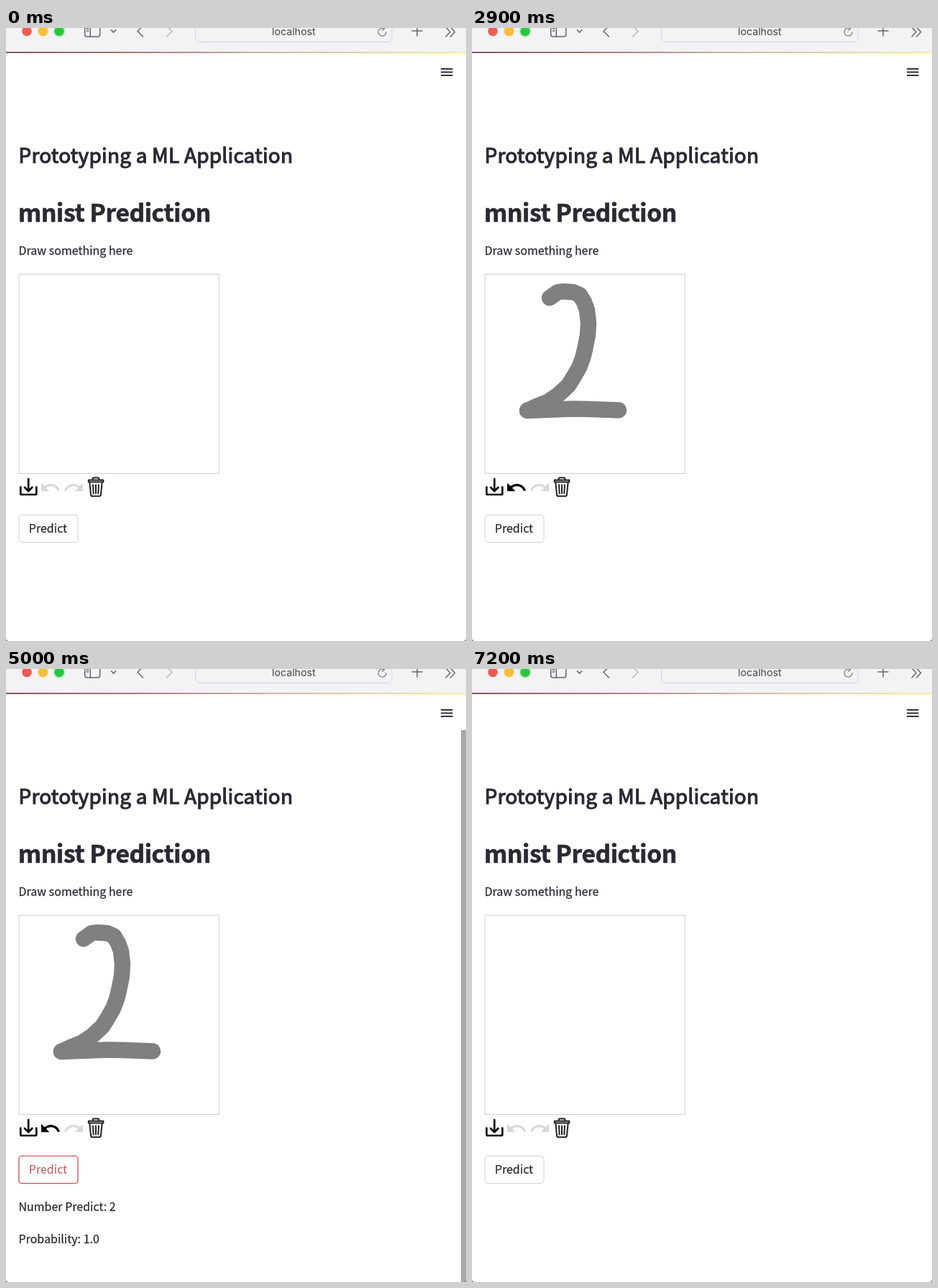
Animation, 640 px wide and 854 px high, one loop 8000 ms. Source, as an HTML page:

```html
<!DOCTYPE html>
<html lang="en">
<head>
<meta charset="utf-8">
<title>mnist Prediction</title>
<style>
  html, body { margin: 0; width: 100%; height: 100%; overflow: hidden; background: #fff; }
  svg { display: block; width: 100vw; height: 100vh; }
  text { font: 400 16px "Noto Sans CJK JP", "Noto Sans CJK SC", "Noto Sans CJK KR", "Noto Sans CJK", "Noto Sans", sans-serif; fill: #292a33; stroke: #292a33; stroke-width: .25px; }
  .address { font: 400 14.2px Inter, sans-serif; fill: #444347; stroke: none; }
  .title { font-size: 28px; letter-spacing: .21px; stroke-width: 1.15px; }
  .heading { font-size: 33.5px; font-weight: 700; letter-spacing: -.33px; stroke-width: .7px; }
  .status { font-size: 14px; }
  .faint { fill: #b0b1b6; stroke: none; }
  .alert { fill: #c25053; stroke: none; }
  .line { fill: none; stroke-linecap: round; stroke-linejoin: round; }
  .chrome { stroke: #67656a; stroke-width: 1.5; }
  .off { fill: #d9d9dd; }

  .ink { stroke: #808080; stroke-width: 22.4; }
  .anim { animation: 8s step-end infinite; }
  #curve { stroke-dasharray: 248 400; animation-name: curve; }
  #base { stroke-dasharray: 129 400; animation-name: base; }
  #undo { animation-name: undo; }
  #running { animation-name: running; }
  #results { animation-name: results; }
  #hover { animation-name: hover; }
  #trash { stroke: #222; animation-name: trash; }

  @keyframes curve {
    0% { opacity: 0; stroke-dashoffset: 247.4; }
    1.25% { opacity: 1; stroke-dashoffset: 247.4; animation-timing-function: steps(9, end); }
    12.5% { opacity: 1; stroke-dashoffset: 110.6; animation-timing-function: steps(7, end); }
    21.25% { opacity: 1; stroke-dashoffset: 0; }
    82.5%, 100% { opacity: 0; stroke-dashoffset: 0; }
  }
  @keyframes base {
    0% { opacity: 0; stroke-dashoffset: 128; }
    22.5% { opacity: 1; stroke-dashoffset: 128; animation-timing-function: steps(8, end); }
    32.5% { opacity: 1; stroke-dashoffset: 0; }
    82.5%, 100% { opacity: 0; stroke-dashoffset: 0; }
  }
  @keyframes undo {
    0% { fill: #d9d9dd; }
    36.25% { fill: #050505; }
    82.5%, 100% { fill: #d9d9dd; }
  }
  @keyframes running {
    0% { opacity: 0; }
    38.75% { opacity: .5; }
    40% { opacity: 1; }
    41.25% { opacity: 0; }
    52.5% { opacity: .5; }
    53.75% { opacity: 1; }
    60% { opacity: 0; }
    87.5% { opacity: .5; }
    88.75% { opacity: 1; }
    90%, 100% { opacity: 0; }
  }
  @keyframes results {
    0% { opacity: 0; }
    58.75% { opacity: 1; }
    88.75%, 100% { opacity: 0; }
  }
  @keyframes hover {
    0% { opacity: 0; }
    45% { opacity: 1; }
    75%, 100% { opacity: 0; }
  }
  @keyframes trash {
    0% { stroke: #222; }
    77.5% { stroke: #c2474a; }
    88.75%, 100% { stroke: #222; }
  }
</style>
</head>
<body>
<svg viewBox="0 0 640 854" preserveAspectRatio="none">
  <defs>
    <linearGradient id="accent">
      <stop offset="0" stop-color="#74484b"/>
      <stop offset=".3" stop-color="#a1736f"/>
      <stop offset=".6" stop-color="#c8b5a8"/>
      <stop offset="1" stop-color="#f4eeb2"/>
    </linearGradient>
    <linearGradient id="glow">
      <stop offset=".4" stop-color="#fffbe0" stop-opacity="0"/>
      <stop offset="1" stop-color="#fffbd0"/>
    </linearGradient>
    <path id="arrow" d="M12.5 8c-2.65 0-5.05 1-6.9 2.6L2 7v9h9l-3.6-3.6c1.4-1.2 3.1-1.9 5.1-1.9 3.5 0 6.5 2.3 7.6 5.5l2.4-.8C21.1 11 17.1 8 12.5 8z"/>
  </defs>

  <!-- browser bar -->
  <rect width="640" height="34" fill="#f4f2f5"/>
  <rect y="33.2" width="640" height="1.8" fill="url(#accent)"/>
  <rect y="35" width="640" height="3" fill="url(#glow)"/>
  <circle cx="52" cy="4.5" r="8.5" fill="#fbe9b8" opacity=".6"/>
  <circle cx="74" cy="4.5" r="9" fill="#aef0b6" opacity=".6"/>
  <circle cx="29" cy="4.5" r="6.8" fill="#ee5c54"/>
  <circle cx="51.5" cy="4.5" r="6.8" fill="#f6be3a"/>
  <circle cx="74" cy="4.5" r="6.8" fill="#2ac73f"/>
  <g class="line chrome">
    <rect x="109.7" y="-5" width="21" height="17" rx="3"/>
    <path d="M117.3 -5V12M112.3 1h2.4M112.3 4h2.4M146.3 2.8l3.3 3.3 3.3-3.3M190.5 -3l-7.5 7.5 7.5 7.5"/>
    <path d="M223.5 -3l7.5 7.5-7.5 7.5" stroke="#b9b7bc"/>
    <path d="M572 -3V11M565 4h14M612 -1l6 6.5-6 6.5M618.5 -1l6 6.5-6 6.5"/>
  </g>
  <rect x="263.5" y="-20" width="273.5" height="39.5" rx="7" fill="#f4f2f5" stroke="#d5d3d8"/>
  <text class="address" x="370" y="10.3">localhost</text>
  <path class="line" stroke="#77757a" stroke-width="1.2" d="M526 .7A5.5 5.5 0 1 0 529 5.6M523.5 -2l3 2.8-3 2.8"/>

  <!-- page header -->
  <path fill="none" stroke="#31333f" stroke-width="1.9" d="M605 57h16.5M605 61.5h16.5M605 66h16.5"/>
  <g id="running" class="anim">
    <g fill="#a4a4a7">
      <circle cx="423" cy="52" r="2.4"/>
      <path d="M413 56h20v2.3h-6.6V73.5h-2.3v-7h-2.2v7h-2.3V58.3H413z"/>
    </g>
    <text class="status faint" x="445" y="67">RUNNING...</text>
    <text class="status" x="542.4" y="67">Stop</text>
  </g>

  <text class="title" x="17.5" y="187.5">Prototyping a ML Application</text>
  <text class="heading" x="17" y="270.3">mnist Prediction</text>
  <text x="17.5" y="316.3">Draw something here</text>

  <!-- drawing area -->
  <rect x="18" y="343" width="278.3" height="277.5" fill="#fff" stroke="#cfcfcf"/>
  <path id="curve" class="line ink anim" d="M108 376L119 368 126 367 141 368 150 372 156 382 160 393 162 411 161 428 157 448 154 460 149 473 141 487 134 498 120 511 105 521 90 527 77 533"/>
  <path id="base" class="line ink anim" d="M77 533L140 530.5 165 531 204 532.5"/>

  <!-- toolbar -->
  <path class="line" stroke="#0c0c0c" stroke-width="2.7" d="M20.3 639.5v9q0 1.5 1.5 1.5h19q1.5 0 1.5-1.5v-9M31.2 628v16M26 640l5.2 5.2 5.2-5.2"/>
  <use id="undo" class="anim" href="#arrow" transform="translate(46.5 624.9) scale(1.27)"/>
  <use class="off" href="#arrow" transform="translate(109.6 624.9) scale(-1.27 1.27)"/>
  <path id="trash" class="line anim" stroke-width="2" d="M114.8 629.8h20.6v2.6h-20.6zM120.6 629.5v-1.4q0-1.5 1.5-1.5h5.8q1.5 0 1.5 1.5v1.4M116.4 633.5l1.7 16.8q.2 1.9 2.1 1.9h9.6q1.9 0 2.1-1.9l1.7-16.8M121 636.5l.7 12M125 636.5v12M129 636.5l-.7 12"/>

  <!-- button -->
  <rect x="18" y="678.5" width="82" height="38" rx="4" fill="#fff" stroke="#d3d3d8"/>
  <text x="31.8" y="703.4">Predict</text>
  <g id="hover" class="anim">
    <rect x="16.5" y="677" width="85" height="42" rx="5" fill="#fbeeee"/>
    <rect x="18" y="678.5" width="82" height="38" rx="4" fill="#fff" stroke="#c2474a" stroke-width="1.2"/>
    <text class="alert" x="31.8" y="703.4">Predict</text>
  </g>

  <g id="results" class="anim">
    <text x="17.5" y="754.5">Number Predict: 2</text>
    <text x="17.5" y="800.2">Probability: 1.0</text>
    <rect x="633" y="85" width="7" height="769" fill="#a9a9ae"/>
  </g>

  <path fill="#6a6a6a" d="M0 850q0 4 4 4H0zM640 850q0 4-4 4h4z"/>
</svg>
</body>
</html>
```
